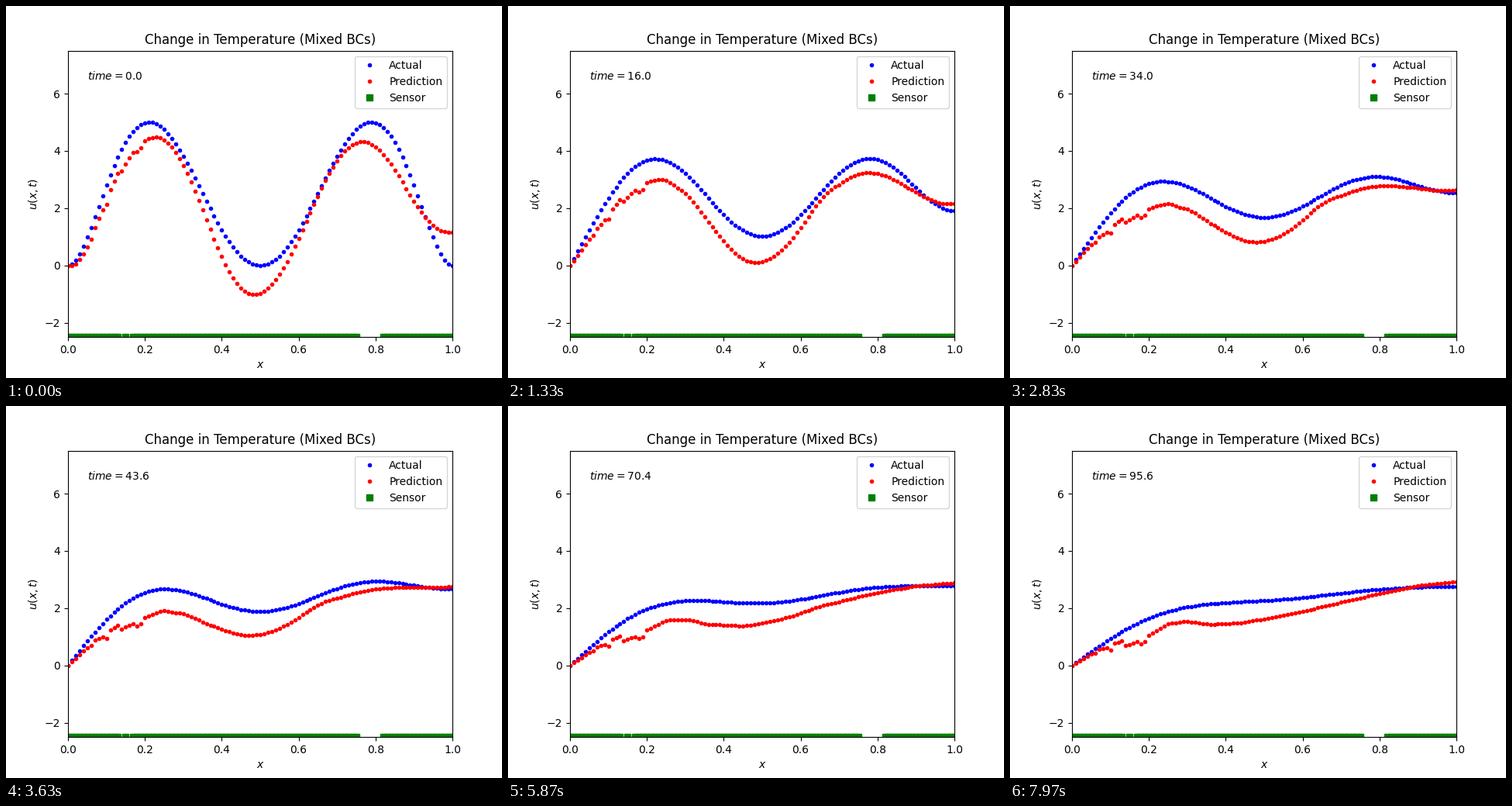
Write a matplotlib script that moves like this. It is 640 px wide and 480 px high and loops after 8000 ms.

```python
import numpy as np
import matplotlib.pyplot as plt
from matplotlib.animation import FuncAnimation

FRAMES, TICK_MS = 400, 20
DT = 0.4          # model time per step, 30 steps a second
T_END = 95.6
ALPHA = 3e-4      # diffusivity

plt.rcParams["font.family"] = "DejaVu Sans"
X = np.linspace(0, 1, 101)


def initial(x):
    return 2160 * (x * (1 - x) * (0.5 - x)) ** 2


# Heat equation with u = 0 on the left and zero flux on the right,
# solved as a sine series with half-integer wave numbers.
WAVES = (np.arange(80) + 0.5) * np.pi
FINE = np.linspace(0, 1, 2001)
COEFS = 2 * np.sin(np.outer(WAVES, FINE)) @ initial(FINE) / 2000
MODES = np.sin(np.outer(WAVES, X))


def heat(t):
    if t == 0:
        return initial(X)
    return (COEFS * np.exp(-ALPHA * WAVES**2 * t)) @ MODES


def through(*points):
    """Straight lines through a few (x, y) points."""
    return np.interp(X, *zip(*points))


def swing(*points):
    """Cosine easing from each turning point to the next."""
    xs, ys = zip(*points)
    turns = np.arange(len(xs))
    phase = np.interp(X, xs, turns)
    phase = np.where(phase < 1, phase**0.8, phase)   # steeper first rise
    step = np.floor(phase)
    return np.interp(step + (1 - np.cos(np.pi * (phase - step))) / 2, turns, ys)


FIRST = swing((0.012, 0), (0.229, 4.48), (0.483, -1.02), (0.765, 4.32),
              (0.99, 1.16))
LAST = through((0, 0), (0.05, 0.38), (0.1, 0.53), (0.17, 0.82), (0.25, 1.46),
               (0.3, 1.54), (0.36, 1.43), (0.45, 1.5), (0.6, 1.89),
               (0.8, 2.51), (0.9, 2.79), (1, 2.92))
TAU = through((0, 36), (0.13, 33), (0.28, 23), (0.38, 25), (0.5, 31),
              (0.6, 34), (0.7, 19), (1, 19))
WALL = 13.5 * X * np.exp(-(X / 0.045) ** 2 / 2)

# Short runs of the prediction sit off the smooth curve all the time.
STEPS = np.zeros_like(X)
for start, stop, lift in [(7, 10, 0.12), (11, 14, 0.2), (18, 20, -0.15)]:
    STEPS[start:stop] = lift


def predict(t):
    """Relax from the first profile to the last, with a surge at the wall."""
    rest = np.exp(-T_END / TAU)
    fade = (np.exp(-t / TAU) - rest) / (1 - rest)
    surge = t / 16 * np.exp(1 - t / 16)
    return LAST + (FIRST - LAST) * fade + WALL * surge + STEPS


fig, ax = plt.subplots(figsize=(6.4, 4.8), dpi=100)
ax.set(xlim=(0, 1), ylim=(-2.5, 7.5), xlabel="$x$", ylabel="$u(x,t)$",
       title="Change in Temperature (Mixed BCs)")
actual, = ax.plot(X, heat(0), "b.", label="Actual")
prediction, = ax.plot(X, predict(0), "r.", label="Prediction")

sensors = np.delete(X, [14, 16, *range(76, 82)])
ax.plot(sensors, np.full_like(sensors, -2.5), "gs", label="Sensor")
ax.legend(loc="upper right")
clock = ax.text(0.05, 6.5, "")


def update(frame):
    # three model steps to every five ticks, rounded to the nearest tick
    t = (3 * frame + 2) // 5 * DT
    actual.set_ydata(heat(t))
    prediction.set_ydata(predict(t))
    clock.set_text(f"$time = {t:.1f}$")
    return actual, prediction, clock


anim = FuncAnimation(fig, update, frames=FRAMES, interval=TICK_MS,
                     repeat=True, repeat_delay=0)
plt.show()
```
